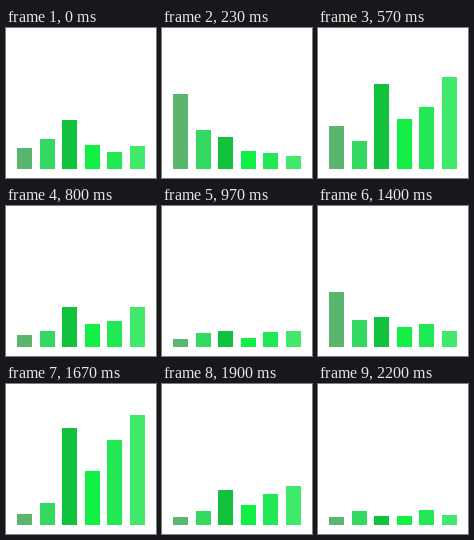
Animation of 150x150 px, one loop 2.23 s. Source, as an HTML page:

```html
<!DOCTYPE html>
<html lang="en">
<head>
<meta charset="utf-8">
<title>Level bars</title>
<style>
html, body { margin: 0; width: 100%; height: 100%; overflow: hidden; background: #fff; }
svg { display: block; width: 100%; height: 100%; }
</style>
</head>
<body>
<svg id="stage" viewBox="0 0 150 150" shape-rendering="crispEdges"></svg>
<script>
const LOOP = 2230, STEP = 100 / 3, BASE = 141;
const COLORS = ['#5ab56f', '#34d961', '#12c13c', '#12f045', '#22e856', '#42ea6b'];
const REST = [8, 14, 9, 9, 15, 10];

// Four beats, low and high drum in turn: bar heights at the onset and at the peak
const low = { rise: 3, fall: 0.87 }, high = { rise: 1, fall: 0.834 };
const HITS = [
  { at: 0, ...low, from: [21, 30, 49, 24, 17, 23], peak: [131, 68, 56, 31, 28, 23] },
  { at: 17, ...high, from: [43, 28, 85, 50, 62, 92], peak: [36, 47, 119, 68, 77, 119] },
  { at: 34, ...low, from: [36, 18, 23, 27, 44, 25], peak: [111, 55, 60, 40, 46, 32] },
  { at: 50, ...high, from: [11, 22, 97, 54, 85, 110], peak: [11, 24, 104, 60, 92, 116] }
];

const stage = document.getElementById('stage');
const bars = COLORS.map((fill, i) => {
  const bar = document.createElementNS('http://www.w3.org/2000/svg', 'rect');
  bar.setAttribute('x', Math.round(11.25 + 22.5 * i));
  bar.setAttribute('width', 15);
  bar.setAttribute('fill', fill);
  return stage.appendChild(bar);
});

// Linear attack, then exponential decay down to the resting height
function level(i, step) {
  const { at, rise, fall, from, peak } = HITS.filter(hit => hit.at <= step).pop();
  const d = step - at;
  const h = d < rise
    ? from[i] + (peak[i] - from[i]) * d / rise
    : peak[i] * Math.pow(fall, d - rise);
  return Math.round(Math.max(REST[i], h));
}

function draw(ms) {
  // Steps of a thirtieth of a second, rounded to the nearest 10 ms
  const t = Math.floor((ms % LOOP) / 10) * 10;
  const step = Math.floor((t + 3.34) / STEP);
  bars.forEach((bar, i) => {
    const h = level(i, step);
    bar.setAttribute('y', BASE - h);
    bar.setAttribute('height', h);
  });
}

const start = performance.now();
function tick() {
  draw(performance.now() - start);
  requestAnimationFrame(tick);
}
tick();
</script>
</body>
</html>
```
